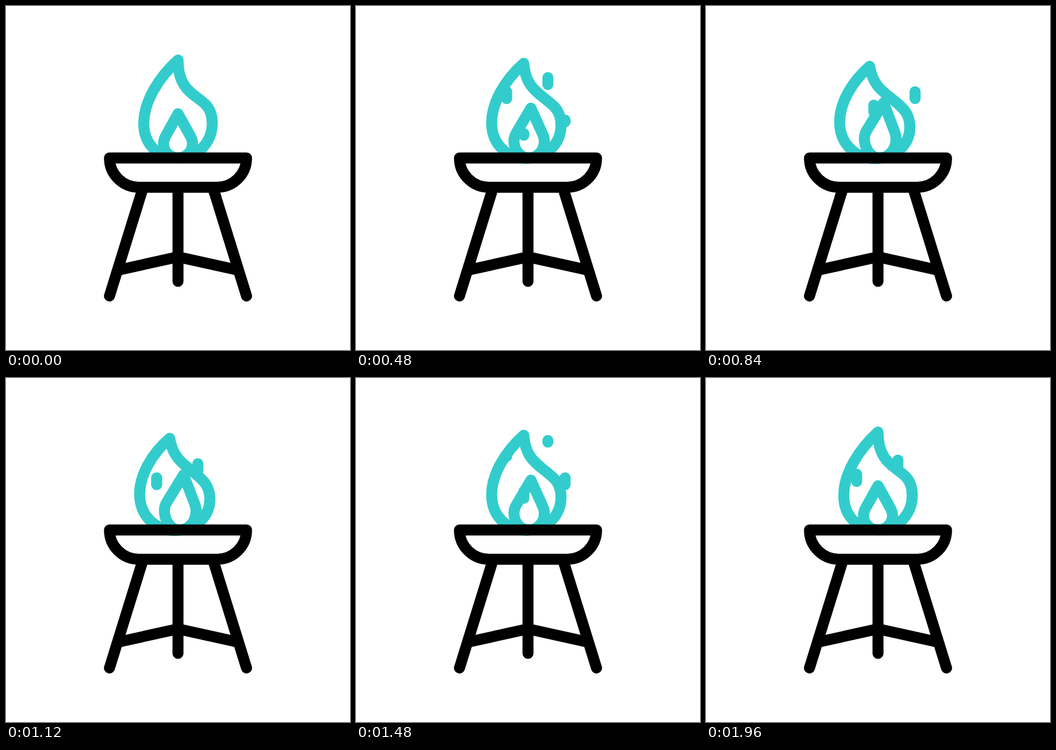
An HTML page that plays this animation: 640x640 px, repeating every 2000 ms.

```html
<!DOCTYPE html>
<html lang="en">
<head>
<meta charset="utf-8">
<title>Fire bowl</title>
<style>
  html, body { margin: 0; width: 100%; height: 100%; overflow: hidden; background: #fff; }
  svg { display: block; width: 100%; height: 100%; }
  path { fill: none; stroke-width: 20.5; stroke-linecap: round; stroke-linejoin: round; }
  .fire path { stroke: #33cccc; }
  .stand path { stroke: #000; }
</style>
</head>
<body>
<svg viewBox="0 0 640 640">
  <g class="fire">
    <path id="outer"/>
    <path id="inner"/>
    <g id="sparks"></g>
  </g>
  <g class="stand">
    <path d="M255 338 L192.5 539.5 M385 338 L447.5 539.5 M320 338 V512.3"/>
    <path d="M209 491.3 L320 466.8 L431 491.3"/>
    <path d="M192.5 282.8 H447.5 C447.5 313 423 337.2 393 337.2 H247 C217 337.2 192.5 313 192.5 282.8 Z"/>
  </g>
</svg>
<script>
  const LOOP = 2000, STEP = 40;
  const SWAY = 980;                       // one lean of the flame, there or back
  const RISE = 640, TAIL_LAG = 80;        // spark travel and delay of its tail
  const SPARK_CYCLE = 800, SPARK_LENGTH = 73;

  // Each flame has an upright and a leaning pose with matching path commands.
  const flames = [
    {
      el: document.getElementById('outer'),
      upright: 'M320 100.5 C284 133 256.3 178 256.3 219 C256.3 256 282 283 320 283 C356 283 383.7 254 383.7 218 C383.7 204 379 191 371 183 C350 163 320 156 320 100.5 Z',
      leaning: 'M303.6 113 C271 141 248.2 180 248.2 216 C248.2 256 278 283.8 314 283.8 C352 283.8 379 258 379 226 C379 212 374 199 365.5 191 C342 165 311 158 303.6 113 Z'
    },
    {
      el: document.getElementById('inner'),
      upright: 'M320 200.5 L297 242 C294.5 246.5 293 251 293 256 C293 271 305 282.6 320 282.6 C335 282.6 347 271 347 256 C347 251 345.5 246.5 343 242 Z',
      leaning: 'M331 179 L299 231 C296 236 294.8 240 294.8 246 C294.8 264 306 282.6 322.5 282.6 C340 282.6 354 268 354 246 C354 242 353 238.5 352 235 Z'
    }
  ];

  const sparks = [
    { x: 280.3, y: 215.5, start: 40 },
    { x: 357, y: 189.2, start: 40 },
    { x: 312.3, y: 240.6, start: 400 },
    { x: 389, y: 215.5, start: 400 }
  ];

  const group = document.getElementById('sparks');
  for (const s of sparks) {
    s.el = document.createElementNS('http://www.w3.org/2000/svg', 'path');
    group.append(s.el);
  }

  const ease = v => {
    const u = Math.min(1, Math.max(0, v));
    return u * u * (3 - 2 * u);
  };

  function blend(from, to, p) {
    const ends = to.match(/[\d.]+/g);
    let i = 0;
    return from.replace(/[\d.]+/g, n => (+n + (ends[i++] - n) * p).toFixed(2));
  }

  function sparkPath({ x, y, start }, t) {
    if (t < start) return '';
    const age = (t - start) % SPARK_CYCLE;
    const head = ease(age / RISE);
    const tail = ease((age - TAIL_LAG) / RISE);
    if (head === 0 || tail === 1) return '';
    return `M${x} ${y - SPARK_LENGTH * tail} V${y - SPARK_LENGTH * head}`;
  }

  function draw() {
    const t = Math.floor(performance.now() % LOOP / STEP) * STEP;
    const lean = ease(1 - Math.abs(t - SWAY) / SWAY);
    for (const f of flames) f.el.setAttribute('d', blend(f.upright, f.leaning, lean));
    for (const s of sparks) s.el.setAttribute('d', sparkPath(s, t));
    requestAnimationFrame(draw);
  }
  draw();
</script>
</body>
</html>
```
